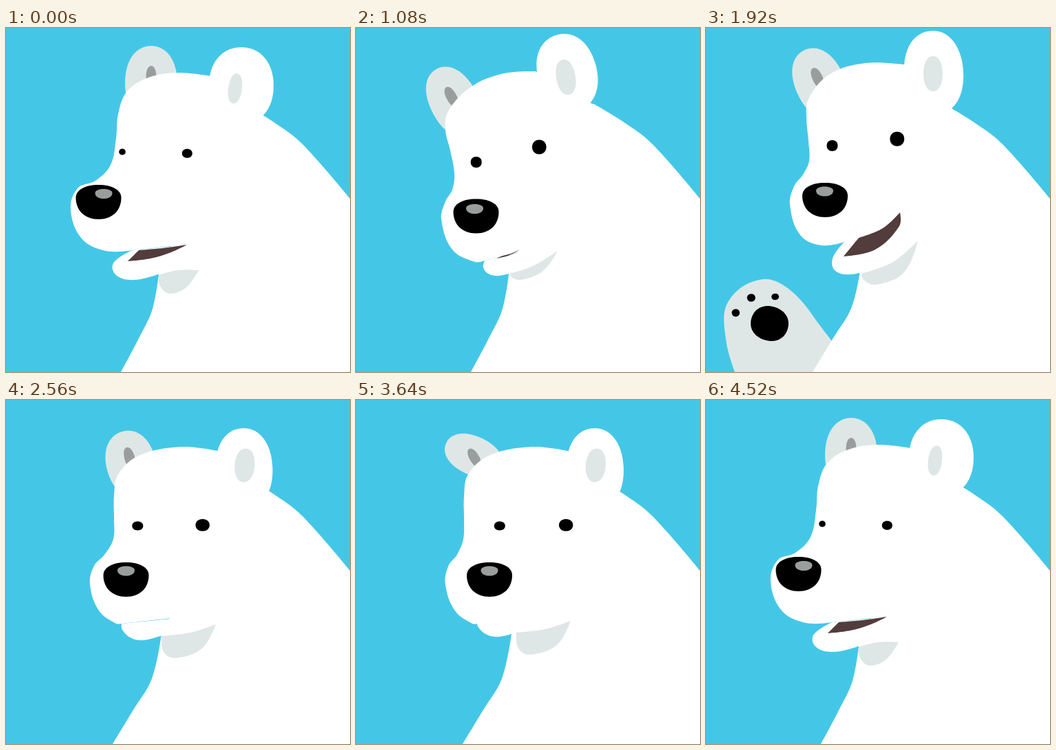
An HTML page for the animation above (4800 ms loop, 500 px wide and 500 px high).

```html
<!DOCTYPE html>
<html lang="en">
<head>
<meta charset="utf-8">
<title>Polar bear</title>
<style>
  html, body { margin: 0; width: 100%; height: 100%; overflow: hidden; background: #44c7e6; }
  svg { display: block; width: 100%; height: 100%; }
</style>
</head>
<body>
<svg id="stage" viewBox="0 0 500 500"></svg>
<script>
const LOOP = 4800, STEP = 40, RAD = Math.PI / 180;
const WHITE = '#fff', SHADE = '#dee7e6', GREY = '#999e9d', BLACK = '#000';

const nums = s => s.split(' ').map(Number);
const lerp = (a, b, u) => a + (b - a) * u;
const mapPose = (p, fn) => Object.fromEntries(Object.entries(p).map(([k, v]) => [k, fn(v, k)]));
const mix = (a, b, u) => mapPose(a, (v, k) => v.map((n, i) => lerp(n, b[k][i], u)));
const mapPoints = (v, fn) => {
  const out = [];
  for (let i = 0; i < v.length; i += 2) out.push(...fn(v[i], v[i + 1], i / 2));
  return out;
};
function spin(x, y, deg) {
  const c = Math.cos(deg * RAD), s = Math.sin(deg * RAD);
  return [x * c - y * s, x * s + y * c];
}

// Smooth closed curve through points; listed corners stay sharp
function outline(v, corners) {
  const pts = mapPoints(v, (x, y) => [[x, y]]), n = pts.length;
  const handle = (i, len) => {
    if (corners.includes(i)) return pts[i];
    const a = pts[(i + n - 1) % n], b = pts[(i + 1) % n];
    const dx = b[0] - a[0], dy = b[1] - a[1], k = len / (Math.hypot(dx, dy) || 1);
    return [pts[i][0] + dx * k, pts[i][1] + dy * k];
  };
  let d = 'M' + pts[0];
  for (let i = 0; i < n; i++) {
    const j = (i + 1) % n, p = pts[i], q = pts[j];
    const len = .36 * Math.hypot(q[0] - p[0], q[1] - p[1]);
    d += 'C' + [handle(i, len), handle(j, -len), q].join(' ');
  }
  return d + 'Z';
}

// Soft ellipse: centre, radii, angle; lift raises its widest line
function blob([x, y, rx, ry, rot], lift) {
  const k = .6, p = (a, b) => {
    const [dx, dy] = spin(a * rx, b * ry, rot);
    return (x + dx) + ' ' + (y + dy) + ' ';
  };
  const up = -lift - k * (1 - lift), down = k - lift * (1 - k);
  return 'M' + p(-1, -lift) +
    'C' + p(-1, up) + p(-k, -1) + p(0, -1) + 'C' + p(k, -1) + p(1, up) + p(1, -lift) +
    'C' + p(1, down) + p(k, 1) + p(0, 1) + 'C' + p(-k, 1) + p(-1, down) + p(-1, -lift) + 'Z';
}

// Paint order: name, colour, and corner list (outline) or lift (blob)
const PARTS = [
  ['body', WHITE, [0, 3, 4, 5, 8, 9]],
  ['farEar', SHADE, 0], ['farIn', GREY, 0],
  ['jaw', WHITE, [0, 4, 5]], ['head', WHITE, [0, 12, 13, 14]],
  ['ear', WHITE, 0], ['earIn', SHADE, 0],
  ['shadow', SHADE, [0, 2]], ['mouth', '#523c3c', [0, 1, 3]],
  ['eyeL', BLACK, 0], ['eyeR', BLACK, 0],
  ['nose', BLACK, .25], ['shine', GREY, .15]
];

const BACK = ' 300 200 345 110 388 136 430 168 500 248 500 500';
const UPRIGHT = nums('167 500 193 451 213 408 223 350' + BACK);
const LEANING = nums('155 500 184 452 212 405 226 340' + BACK);

function innerEar([x, y, , , rot]) {
  const [dx, dy] = spin(0, -9, rot);
  return [x + dx, y + dy, 7.5, 16, rot];
}
function pose(body, o) {
  const p = mapPose(o, nums);
  p.body = body;
  p.farIn = innerEar(p.farEar);
  p.head.push(345, 111, 305, 310);
  p.jaw.push(300, 312);
  p.nose.push(33, 25, 0);
  p.shine.push(12.5, 7, 0);
  return p;
}

const profile = pose(UPRIGHT, {
  head: '184 323 145 324 110 306 94 264 104 233 130 222 152 199 160 160 163 125 176 92 207 72 250 65 298 70',
  jaw: '184 323 156 342 161 360 188 366 224 357',
  shadow: '222 359 250 352 280 352 262 377 238 386 224 375',
  mouth: '177 339 193 323 228 320 263 315 240 326 210 335',
  farEar: '211 80 38 54 0', ear: '342 84 47 56 0', earIn: '333 88 10 22 8',
  eyeL: '169 180 4.8 4.6 0', eyeR: '263.3 182.3 7.5 6.5 0',
  nose: '134.5 253', shine: '142 241'
});
const tilted = pose(UPRIGHT, {
  head: '187 338 173 340 140 322 124 278 130 252 140 235 143 212 137 178 130 148 134 121 168 85 215 66 261 63',
  jaw: '187 338 185 348 192 357 208 360 240 352',
  shadow: '223 357 257 346 293 324 272 353 240 366 227 363',
  mouth: '204 335 213 331 225 328 238 322 230 327 218 332',
  farEar: '143 108 35 55 -28', ear: '307 65 43 57 -15', earIn: '305 71.5 14 26 -10',
  eyeL: '174.7 195 8 8 0', eyeR: '266.3 173 10.3 10.5 0',
  nose: '174.5 273.5', shine: '172.5 263'
});
const happy = pose(LEANING, {
  head: '201 311 168 316 137 301 122 257 128 230 141 213 150 193 149 165 146 130 149 103 180 67 232 51 288 53',
  jaw: '201 311 184 335 188 353 212 358 240 350',
  shadow: '226 357 272 340 308 309 288 355 248 373 230 367',
  mouth: '200 332 222 305 257 291 282 268 281 288 246 322',
  farEar: '166 81 36 54 -25', ear: '331 65 43 61 -4', earIn: '330 66.5 14 25.5 0',
  eyeL: '183.5 171 8 8 0', eyeR: '277.8 161.3 10.4 10.5 0',
  nose: '173 250', shine: '172.5 237.5'
});
const calm = pose(LEANING, {
  head: '168 325 160 325 135 306 122 268 128 241 143 225 156 202 157 172 157 140 163 108 195 80 256 68 308 74',
  jaw: '168 325 169 334 182 346 201 349 230 341',
  shadow: '226 343 268 338 305 326 285 361 246 375 229 366',
  mouth: '185 332 195 332 215 332 236 332 220 332 202 332',
  farEar: '182 93 36 49 -15', ear: '346 100 41.5 59 -2', earIn: '347 95 14.5 24.5 5',
  eyeL: '191.3 183 8 6.4 0', eyeR: '285.7 181.8 10.2 8.8 0',
  nose: '174.5 261', shine: '174.5 248.5'
});

// Whole head turned about its middle, then shifted
function turn(p, deg, sx, sy) {
  const move = (x, y) => {
    const [dx, dy] = spin(x - 250, y - 260, deg);
    return [250 + dx + sx, 260 + dy + sy];
  };
  return mapPose(p, (v, k) => k === 'body' ? v : v.length === 5
    ? [...move(v[0], v[1]), v[2], v[3], v[4] + deg] : mapPoints(v, move));
}
const slide = (v, dx, dy = 0) => v.length === 5
  ? [v[0] + dx, v[1] + dy, ...v.slice(2)] : mapPoints(v, (x, y) => [x + dx, y + dy]);

const glance = { ...calm,
  head: mapPoints(calm.head, (x, y, i) => [x + 9 * Math.max(0, 1 - (i / 6) ** 3), y]),
  jaw: slide(calm.jaw, 8, -5), shadow: slide(calm.shadow, 7, -5),
  ear: slide(calm.ear, 1.5), earIn: slide(calm.earIn, 1.5),
  eyeL: slide(calm.eyeL, 17.5), eyeR: slide(calm.eyeR, 19.5),
  nose: slide(calm.nose, 19.5), shine: slide(calm.shine, 19.5)
};
const bent = [171, 81, 28, 44, -65];
const flop = { ...glance, farEar: bent, farIn: [172, 84, 7, 15, -30] };

const cockedLean = turn(calm, 6, -1, -10);
const cocked = { ...cockedLean, body: UPRIGHT };
const tiltedShut = { ...mix(tilted, happy, -.13), body: UPRIGHT,
  mouth: mapPoints(tilted.mouth, x => [x, 335 - (x - 204) * .38]) };
const tiltedOpen = { ...mix(tilted, happy, .45), body: UPRIGHT };

const BEAR_KEYS = [
  [0, profile], [240, cocked], [560, cocked], [760, tiltedShut], [1040, tiltedShut],
  [1080, tilted], [1160, tiltedOpen], [1360, tiltedOpen], [1560, happy], [2400, happy],
  [2560, calm], [2760, calm], [3000, glance], [3280, glance],
  [3400, flop], [3520, glance], [3640, flop], [3760, glance],
  [4160, cockedLean], [4520, profile], [LOOP, profile]
];

// The arm swings about an elbow below the stage
const ELBOW = '198 616', DOWN = -65, OUT = -7;
const PAW_KEYS = [[0, DOWN], [1360, DOWN]];
for (let i = 0; i < 6; i++) PAW_KEYS.push([1560 + i * 120, i % 2 ? OUT : 0]);
PAW_KEYS.push([2400, OUT], [2560, DOWN], [LOOP, DOWN]);

const ease = u => u * u * (3 - 2 * u);
function sample(keys, t, blend) {
  const i = keys.findIndex(k => k[0] > t);
  const [t0, a] = keys[i - 1], [t1, b] = keys[i];
  return a === b ? a : blend(a, b, ease((t - t0) / (t1 - t0)));
}

const stage = document.getElementById('stage');
function add(tag, parent, attrs) {
  const el = document.createElementNS('http://www.w3.org/2000/svg', tag);
  for (const k in attrs) el.setAttribute(k, attrs[k]);
  return parent.appendChild(el);
}

const paw = add('g', stage);
const arm = nums('78 570 61 500 50 430 61 378 112 353 153 375 193 438 235 510 230 580');
add('path', paw, { fill: SHADE, d: outline(arm, [0, 7, 8]) });
for (const s of ['116 418 27.5 25 25', '69 396.7 5.7 5.5 0', '94 377.7 6 5.6 0', '128.8 380.4 5.4 4.6 0'])
  add('path', paw, { fill: BLACK, d: blob(nums(s), 0) });

const bear = PARTS.map(([name, fill, form]) => ({
  name, el: add('path', stage, { fill }),
  trace: v => Array.isArray(form) ? outline(v, form) : blob(v, form)
}));

const start = performance.now();
function draw() {
  const t = Math.floor((performance.now() - start) % LOOP / STEP) * STEP;
  paw.setAttribute('transform', `rotate(${sample(PAW_KEYS, t, lerp)} ${ELBOW})`);
  const now = sample(BEAR_KEYS, t, mix);
  for (const part of bear) part.el.setAttribute('d', part.trace(now[part.name]));
  requestAnimationFrame(draw);
}
draw();
</script>
</body>
</html>
```
